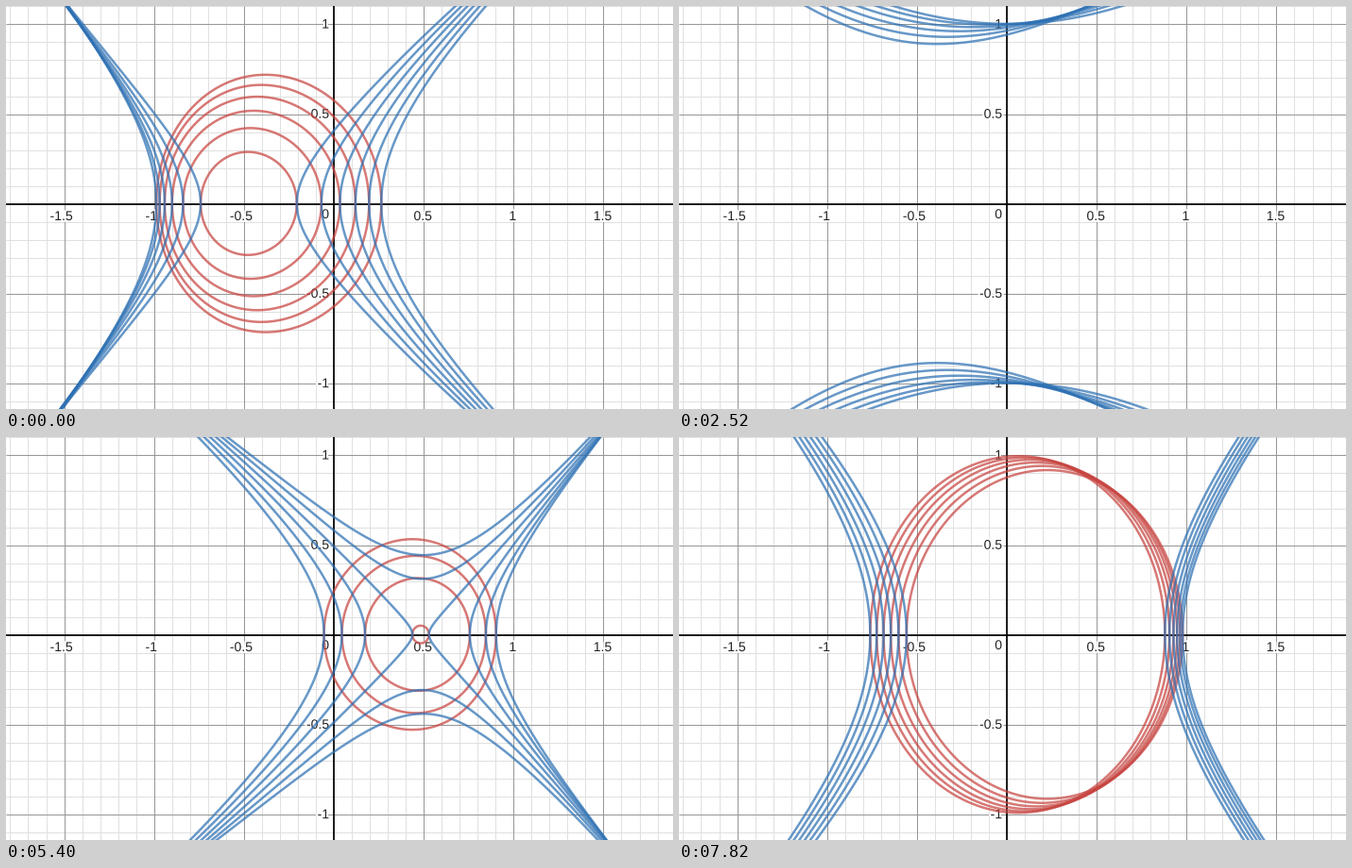
A matplotlib script for the animation above (8000 ms loop, 706 px wide and 427 px high).

```python
import numpy as np
import matplotlib.pyplot as plt
import matplotlib.patheffects as pe
from matplotlib.animation import FuncAnimation
from matplotlib.collections import LineCollection

W, H, DPI = 706, 427, 64
PX = 72 / DPI                    # one pixel in points
CX, CY, UNIT = 346.5, 209.2, 190.3
LOOP, TICK = 8000, 20
FIRST, STEP = 35, 173            # first redraw and time between redraws, in ms
RED, BLUE = "#c74440", "#2d70b3"

# phase of the sine at a few redraws
KEYS = {0: -0.338, 9: 0.5, 15: 1.08, 22: 1.72, 32: 2.6965, 46: 4.01}

plt.rcParams["font.family"] = "Liberation Sans"
fig = plt.figure(figsize=(W / DPI, H / DPI), dpi=DPI, facecolor="white")
ax = fig.add_axes([0, 0, 1, 1])
ax.set_xlim(0, W)
ax.set_ylim(H, 0)
ax.axis("off")


def to_px(x, y):
    return np.column_stack([CX + UNIT * x, CY - UNIT * y])


def add_grid(step, count, color, width):
    k = step * np.arange(-count, count + 1)
    xs, ys = np.floor(to_px(k, k)).T + 0.5
    lines = [[(x, 0), (x, H)] for x in xs] + [[(0, y), (W, y)] for y in ys]
    ax.add_collection(LineCollection(lines, colors=color, linewidths=width * PX))


def add_label(x, y, text, align):
    halo = pe.withStroke(linewidth=4 * PX, foreground="white")
    ax.text(x, y, text, size=14 * PX, color="#222222", ha=align,
            va="baseline", path_effects=[halo], zorder=2)


def draw_plane():
    add_grid(0.1, 18, "#e0e0e0", 1)
    add_grid(0.5, 3, "#969696", 1)
    add_grid(1, 0, "black", 1.7)
    for v in (-1.5, -1, -0.5, 0.5, 1, 1.5):
        x, y = to_px(v, v)[0]
        add_label(x - (2.5 if v < 0 else 0.5), 227, f"{v:g}", "center")
        if abs(v) < 1.5:
            add_label(342, y + 4.7, f"{v:g}", "right")
    add_label(342, 225, "0", "right")


def g(x, a):
    return x * x + np.sin(x + a)


def slope(x, a):
    return 2 * x + np.cos(x + a)


def curvature(x, a):
    return 2 - np.sin(x + a)


def newton(f, df, x, a):
    for _ in range(12):
        x -= f(x, a) / df(x, a)
    return x


def height(x, a):
    return np.sqrt(np.abs(g(x, a)))


ANGLE = np.linspace(0, 2 * np.pi, 181)
SWEEP = np.linspace(-1.4, 1.4, 181)
SPAN = np.linspace(-1.9, 1.9, 191)


def curves(a):
    """Return (red, blue) paths of y^2 = -g and y^2 = g."""
    low = newton(slope, curvature, 0.0, a)
    if g(low, a) >= 0:
        y = height(SPAN, a)
        return [], [to_px(SPAN, y), to_px(SPAN, -y)]
    left = newton(g, slope, low - 2, a)
    right = newton(g, slope, low + 2, a)
    x = (left + right) / 2 + (right - left) / 2 * np.cos(ANGLE)
    red = [to_px(x, np.sign(np.sin(ANGLE)) * height(x, a))]
    blue = []
    for root, side in ((left, -1), (right, 1)):
        x = root + side * SWEEP ** 2
        blue.append(to_px(x, np.sign(SWEEP) * height(x, a)))
    return red, blue


draw_plane()
red_lines, blue_lines = (
    ax.add_collection(LineCollection([], colors=c, alpha=0.72,
                                     linewidths=2.5 * PX, zorder=z))
    for c, z in ((RED, 3), (BLUE, 4)))


def update(i):
    t = i * TICK + TICK / 2
    redraw = (t - FIRST) // STEP + 1
    phase = np.interp(redraw, list(KEYS), list(KEYS.values()))
    red, blue = [], []
    for k in range(6):
        r, b = curves(phase + 0.1 * k)
        red += r
        blue += b
    red_lines.set_segments(red)
    blue_lines.set_segments(blue)
    return red_lines, blue_lines


anim = FuncAnimation(fig, update, frames=LOOP // TICK, interval=TICK,
                     repeat=True, repeat_delay=0, blit=False)
plt.show()
```
